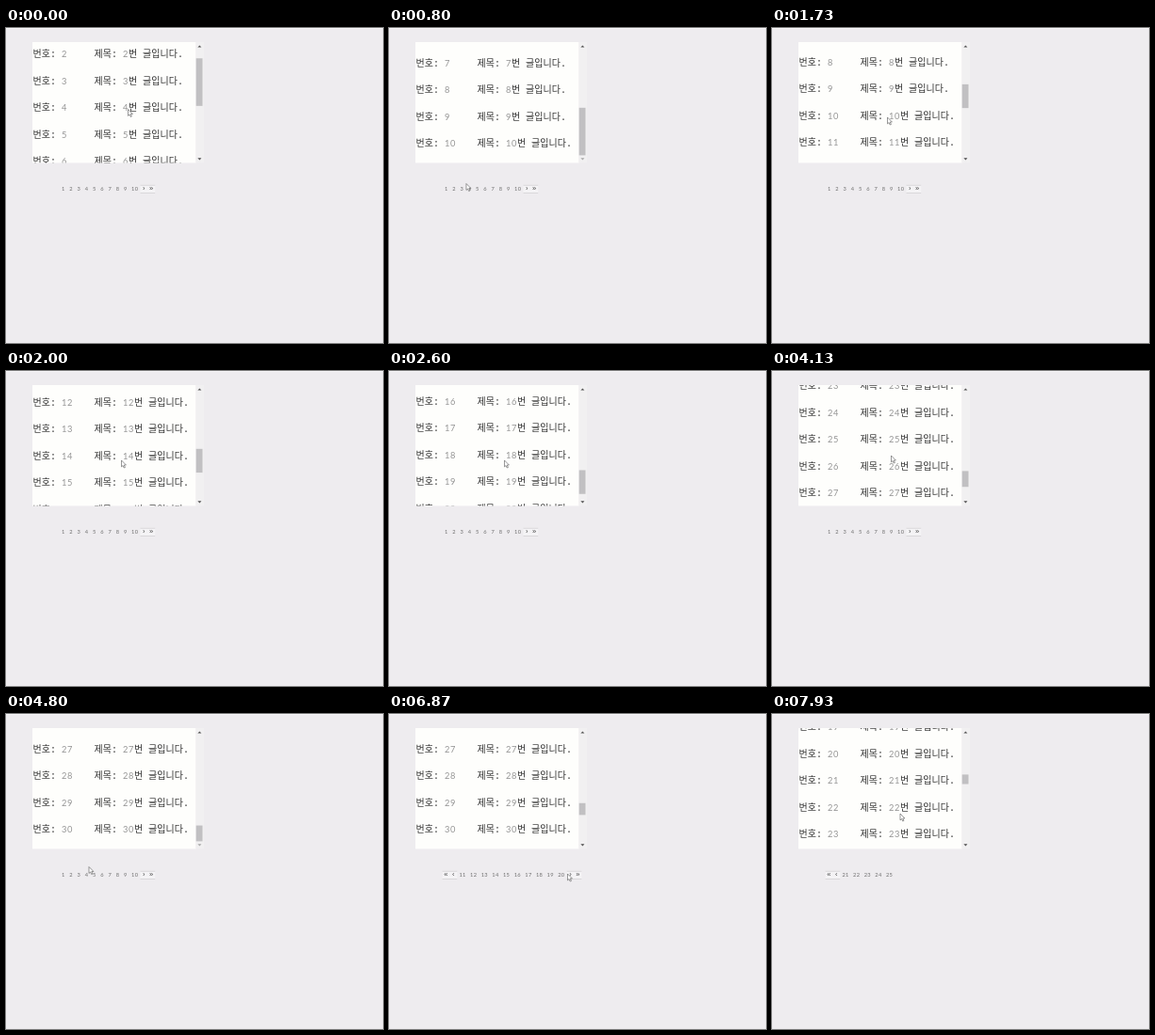
Write an HTML page that moves like this. It is 400 by 335 pixels and loops after 8 s.

```html
<!DOCTYPE html>
<html lang="ko">
<head>
<meta charset="utf-8">
<title>Paged list</title>
<style>
  html, body { margin: 0; width: 100%; height: 100%; overflow: hidden; background: #eeecef; }
  svg { display: block; }
  text { white-space: pre; font-family: "Liberation Mono", "Noto Sans CJK KR", "Noto Sans CJK", monospace; }
  #rows { font-size: 10px; fill: #303030; }
  .num { font-family: Lato, sans-serif; font-size: 9.3px; letter-spacing: .6px; fill: #959595; }
  #pager { text-anchor: middle; }
  #pager .num { font-size: 5.7px; letter-spacing: .3px; fill: #6c6c6c; }
  #pager .arrow { font: 7.6px "Liberation Sans", sans-serif; fill: #444; }
</style>
</head>
<body>
<svg width="400" height="335" viewBox="0 0 400 335">
  <defs><clipPath id="view"><rect x="28" y="15" width="173.5" height="128.5"/></clipPath></defs>
  <rect width="400" height="1" fill="#f7f6f8"/>
  <rect x="28" y="15" width="173.5" height="128.5" fill="#fefefc"/>
  <g clip-path="url(#view)"><g id="rows"></g></g>
  <rect x="201.5" y="15" width="8.5" height="128.5" fill="#f1f0f1"/>
  <path d="M203.4 20.6l2-2.2 2 2.2z" fill="#505050"/>
  <path id="down" d="M203.4 138.2l2 2.2 2-2.2z"/>
  <rect id="thumb" x="201.7" width="6.8" fill="#c1c0c2"/>
  <g id="pager"></g>
  <path id="cursor" d="M0 0v6.9l1.6-1.4 1.1 2.5 1.2-.5-1.1-2.5h2.1z"
        fill="#fff" stroke="#555" stroke-width=".6" stroke-linejoin="round"/>
</svg>
<script>
const LOOP = 8000, FPS = 15;
const VIEW = 128.5, PITCH = 28.5, TRACK_TOP = 23.4, TRACK = 112;
const PER_PAGE = 10, LAST_PAGE = 25;
const $ = id => document.getElementById(id);

const listHeight = rows => 28 + PITCH * (rows - 1);
const bottom = rows => listHeight(rows) - VIEW;
const progress = (t, start, ms) => Math.min(1, Math.max(0, (t - start) / ms));
const smooth = p => p * p * (3 - 2 * p);
const mix = (a, b, p) => a + (b - a) * p;

// Each opened page appends ten rows to the list
const visits = [
  { at: 0, page: 1 }, { at: 1400, page: 2 }, { at: 3530, page: 3 },
  { at: 5530, page: 11 }, { at: 7130, page: 21 }
];
const spins = [
  { at: 0, ms: 530, to: bottom(10) },
  { at: 1670, ms: 430, to: 344 },
  { at: 2400, ms: 270, to: bottom(20) },
  { at: 3800, ms: 500, to: bottom(30) },
  { at: 7735, ms: 200, to: 521.5 }
];
// Pointer stops: arrival time and place, all reached at the same pace
const MOVE = 330;
const stops = [
  { at: 0, x: 129.5, y: 86.5 }, { at: 800, x: 82, y: 165.5 }, { at: 1130, x: 69, y: 170 },
  { at: 1730, x: 122.5, y: 95 }, { at: 3130, x: 77, y: 172 }, { at: 3800, x: 126.5, y: 90 },
  { at: 4800, x: 88, y: 162.5 }, { at: 5130, x: 146, y: 170 }, { at: 6330, x: 170, y: 60 },
  { at: 6870, x: 189.5, y: 170 }, { at: 7200, x: 165, y: 163 }, { at: 7930, x: 136, y: 106 }
];

const scrollAt = t => spins.reduce((y, s) => mix(y, s.to, progress(t, s.at, s.ms)), 21.5);

function pointerAt(t) {
  return stops.reduce((from, s) => {
    const p = smooth(progress(t, s.at - MOVE, MOVE));
    return { x: mix(from.x, s.x, p), y: mix(from.y, s.y, p) };
  }, stops[0]);
}

function rowMarkup(n) {
  const y = 25.5 + PITCH * (n - 1), num = `<tspan class="num">${n}</tspan>`;
  return `<text x="28.5" y="${y}">번호: ${num}</text>` +
         `<text x="93.5" y="${y}">제목: ${num}번 글입니다.</text>`;
}

function pagerMarkup(page) {
  const first = page - (page - 1) % 10, last = Math.min(first + 9, LAST_PAGE);
  let x = 56.6, out = "";
  const buttons = signs => {
    out += `<rect x="${x}" y="167" width="15.7" height="8.8" fill="#f4f3f5"/>` +
           `<path d="M${x} 167.3h15.7M${x} 175.5h15.7" stroke="#cfcdd0" stroke-width=".7"/>`;
    for (const s of signs) {
      out += `<text class="arrow" x="${x + 3.8}" y="173.3">${s}</text>`;
      x += 7.8;
    }
  };
  if (first > 1) buttons("«‹");
  for (let n = first; n <= last; n++) {
    const w = n < 10 ? 8.25 : 11.65;
    out += `<text class="num" x="${x + w / 2}" y="173.2">${n}</text>`;
    x += w;
  }
  if (last < LAST_PAGE) buttons("›»");
  return out;
}

$("rows").innerHTML = Array.from({ length: 50 }, (_, i) => rowMarkup(i + 1)).join("");

let shownPage = 0;
function draw() {
  // The small offset keeps rounded times on the right step
  const step = Math.floor((performance.now() + 4) % LOOP * FPS / 1000);
  const t = step * 1000 / FPS + 4;
  const opened = visits.filter(v => v.at <= t);
  const rows = opened.length * PER_PAGE, page = opened.at(-1).page;
  const max = bottom(rows), scroll = Math.min(max, scrollAt(t));
  const size = TRACK * VIEW / listHeight(rows);
  const { x, y } = pointerAt(t);

  $("rows").setAttribute("transform", `translate(0 ${-scroll})`);
  $("thumb").setAttribute("y", TRACK_TOP + scroll / max * (TRACK - size));
  $("thumb").setAttribute("height", size);
  $("down").setAttribute("fill", scroll > max - 1 ? "#a8a8a8" : "#505050");
  $("cursor").setAttribute("transform", `translate(${x} ${y})`);
  if (page !== shownPage) {
    shownPage = page;
    $("pager").innerHTML = pagerMarkup(page);
  }
  requestAnimationFrame(draw);
}
draw();
</script>
</body>
</html>
```
